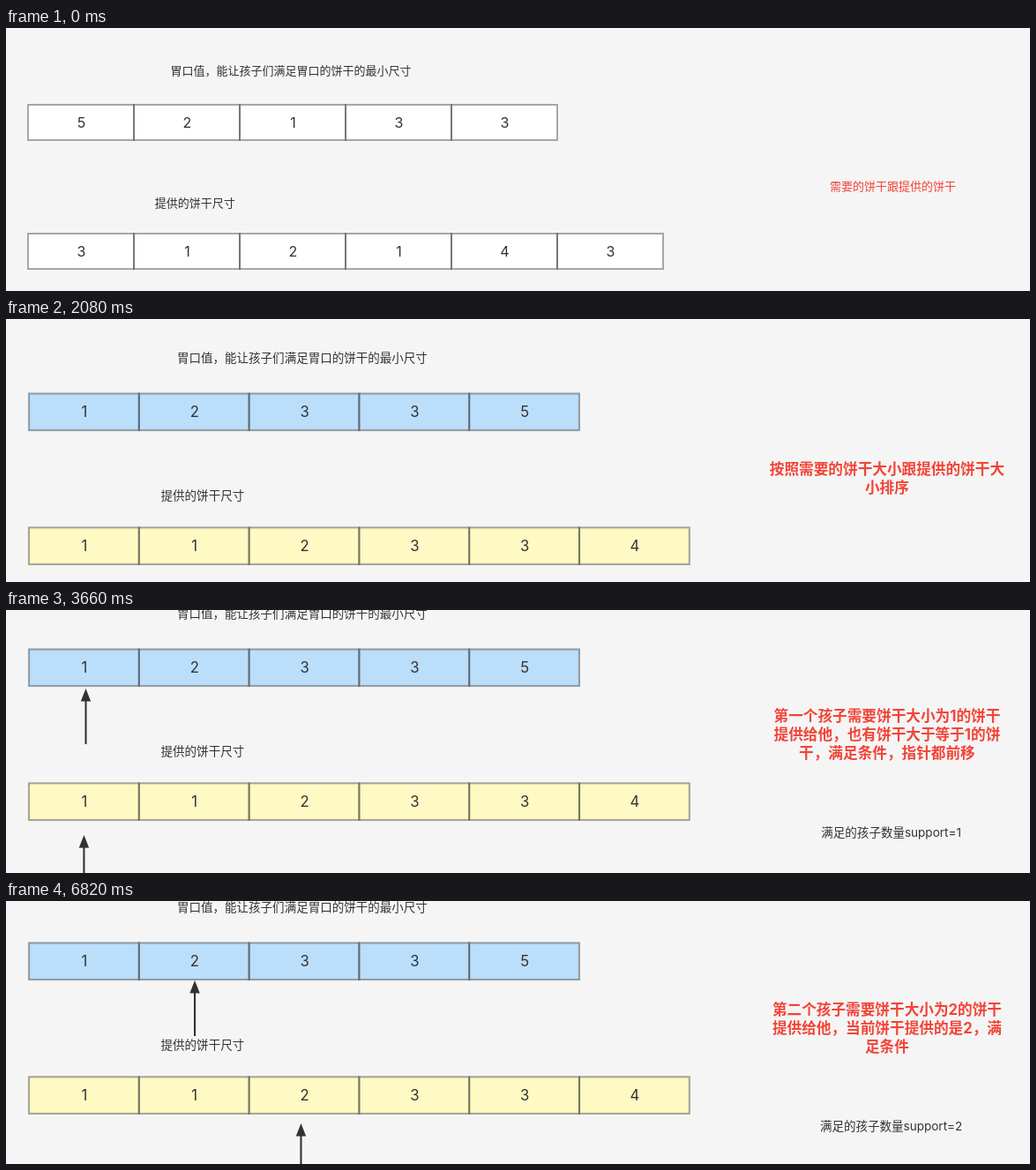
Animation, 1161 px wide and 298 px high, one loop 8000 ms. Source, as an HTML page with a canvas:

```html
<!DOCTYPE html>
<html lang="zh-CN">
<head>
<meta charset="utf-8">
<style>
  html, body { margin: 0; width: 100%; height: 100%; overflow: hidden; background: #f5f5f5; }
  canvas { display: block; }
</style>
</head>
<body>
<canvas id="stage" width="1161" height="298"></canvas>
<script>
const ctx = document.getElementById('stage').getContext('2d');
const FONT = 'Inter, "Noto Sans CJK SC", "Noto Sans CJK", sans-serif';
const INK = '#323232', RED = '#f44336';
const LOOP = 8000, CELL_W = 120, CELL_H = 40, LEFT = 25;
const APPETITE_Y = 87, COOKIE_Y = 233;

// Steps in diagram coordinates; scale and dy are the camera.
const sorted = {
  scale: 1.04, dy: -6, fills: ['#bbdefb', '#fff9c4'],
  appetites: [1, 2, 3, 3, 5], cookies: [1, 1, 2, 3, 3, 4],
  noteX: 960.5, noteSize: 16, bold: true
};
const steps = [
  {
    at: 0, scale: 1, dy: 0, fills: ['#fff', '#fff'],
    appetites: [5, 2, 1, 3, 3], cookies: [3, 1, 2, 1, 4, 3],
    noteX: 1005.5, noteSize: 13, note: ['需要的饼干跟提供的饼干']
  },
  { ...sorted, at: 500, noteSize: 13, bold: false, note: ['按照需要的饼干大小跟提供的饼干大小排序'] },
  { ...sorted, at: 2080, note: ['按照需要的饼干大小跟提供的饼干大', '小排序'] },
  {
    ...sorted, at: 3660, dy: -46, support: 1,
    note: ['第一个孩子需要饼干大小为1的饼干', '提供给他，也有饼干大于等于1的饼', '干，满足条件，指针都前移'],
    arrows: [[87, 129.8], [85, 289.4]]
  },
  {
    ...sorted, at: 5240, dy: -46, support: 1,
    note: ['第二个孩子需要饼干大小为2的饼干', '提供给他，当前饼干提供的是1不满', '足条件，寻找下一个饼干'],
    arrows: [[205.8, 127.9], [203.8, 289.4]]
  },
  {
    ...sorted, at: 6820, dy: -43, support: 2,
    note: ['第二个孩子需要饼干大小为2的饼干', '提供给他，当前饼干提供的是2，满', '足条件'],
    arrows: [[205.8, 127.9], [321.6, 283.7]]
  }
];

function text(str, x, y, size = 13, color = INK, weight = 400) {
  ctx.font = `${weight} ${size}px ${FONT}`;
  ctx.textAlign = 'center';
  ctx.fillStyle = color;
  ctx.fillText(str, x, y + size * 0.37);
}

function row(values, y, fill) {
  ctx.fillStyle = fill;
  ctx.fillRect(LEFT, y, CELL_W * values.length, CELL_H);
  ctx.strokeStyle = 'rgba(50, 50, 50, 0.42)';
  ctx.lineWidth = 2;
  values.forEach((value, i) => {
    const x = LEFT + i * CELL_W;
    ctx.strokeRect(x, y, CELL_W, CELL_H);
    text(value, x + CELL_W / 2 + 0.5, y + CELL_H / 2, 16);
  });
}

function arrow([x, tip]) {
  ctx.fillStyle = INK;
  ctx.fillRect(x - 1, tip + 8, 2, 52.6);
  ctx.beginPath();
  ctx.moveTo(x, tip);
  ctx.lineTo(x + 5.5, tip + 14);
  ctx.lineTo(x - 5.5, tip + 14);
  ctx.fill();
}

function draw() {
  const time = performance.now() % LOOP;
  const step = steps.findLast(s => s.at <= time);
  ctx.setTransform(1, 0, 0, 1, 0, 0);
  ctx.fillStyle = '#f5f5f5';
  ctx.fillRect(0, 0, 1161, 298);
  ctx.setTransform(step.scale, 0, 0, step.scale, 0, step.dy);

  text('胃口值，能让孩子们满足胃口的饼干的最小尺寸', 323, 48);
  row(step.appetites, APPETITE_Y, step.fills[0]);
  text('提供的饼干尺寸', 214.3, 198);
  row(step.cookies, COOKIE_Y, step.fills[1]);
  (step.arrows || []).forEach(arrow);

  const top = 179.6 - (step.note.length - 1) * 10.1;
  step.note.forEach((line, i) =>
    text(line, step.noteX, top + i * 20.2, step.noteSize, RED, step.bold ? 700 : 400));
  if (step.support) text(`满足的孩子数量support=${step.support}`, 965, 286.5);

  requestAnimationFrame(draw);
}
draw();
</script>
</body>
</html>
```
